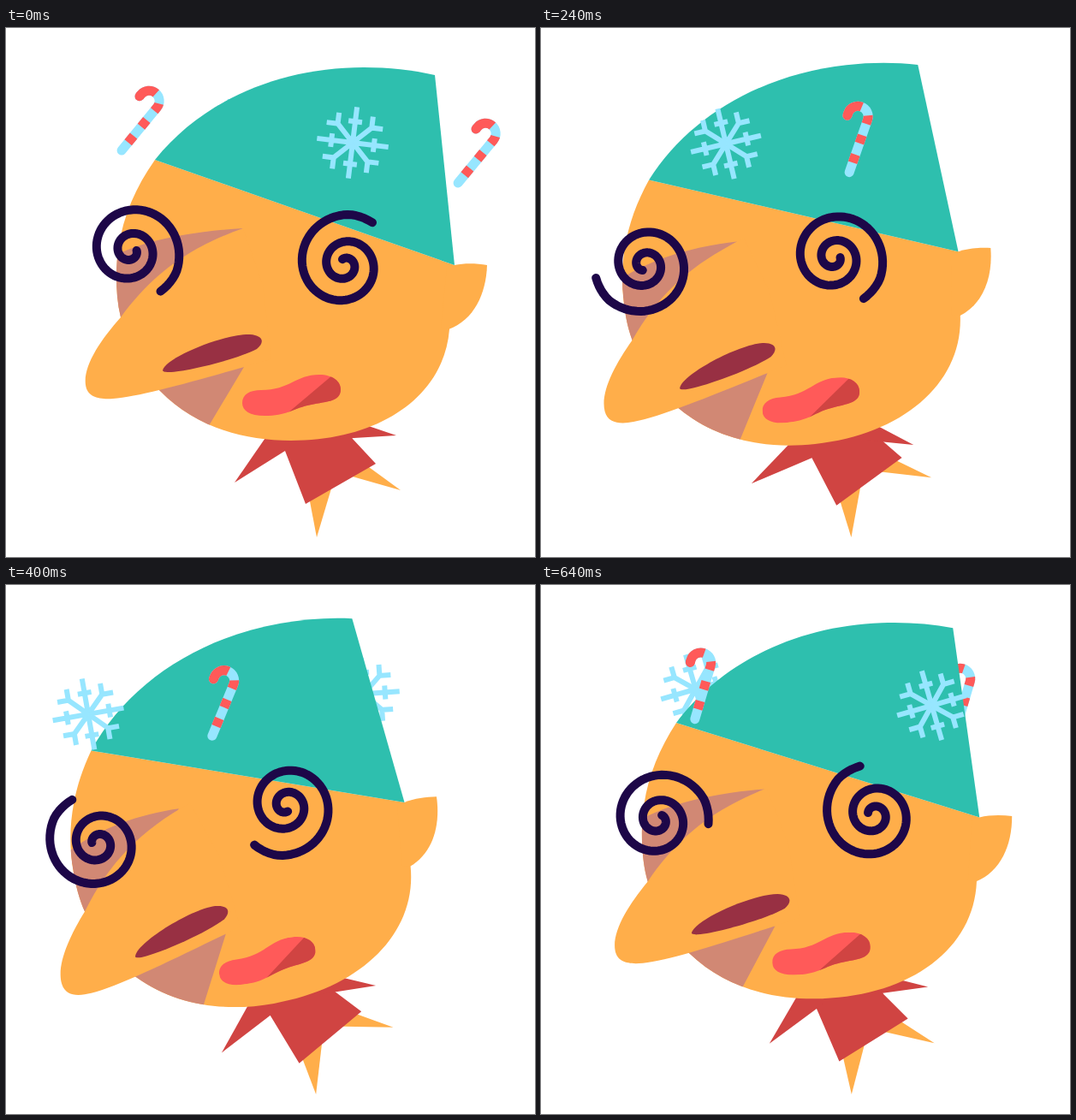
Recreate the animation shown at these times as an HTML page. Size 618 by 618 pixels, loop 0.72 s.

```html
<!DOCTYPE html>
<html lang="en">
<head>
<meta charset="utf-8">
<title>Dizzy elf</title>
<style>
  html, body { margin: 0; width: 100%; height: 100%; overflow: hidden; background: #fff; }
  svg { display: block; width: 100%; height: 100%; }
</style>
</head>
<body>
<svg viewBox="0 0 618 618">
  <defs>
    <path id="face" d="M174 154C145 195 129 240 129 290C129 306 130 322 134 338C145 375 160 405 180 424C220 465 275 482 333 482C437 482 512 430 518 352L524 277Z"/>
    <clipPath id="inFace"><use href="#face"/></clipPath>
    <clipPath id="lips">
      <path d="M276 438C276 428 285 423 298 423C332 423 338 405 366 405C382 405 391 413 391 422C391 438 372 436 352 441C335 445 328 453 302 453C285 453 276 447 276 438Z"/>
    </clipPath>
  </defs>
  <g id="tilt">
    <g id="back"></g>

    <g fill="#ffae4a">
      <path d="M363 595L346 506L389 508Z"/>
      <path id="neckTip"/>
    </g>
    <g fill="#d04442">
      <path d="M310 450L326 494L350 556L432 509L405 480L385 450Z"/>
      <path id="spikeL" d="M267 531L316 460L334 489Z"/>
      <path id="spikeR" d="M456 476L400 457L390 480Z"/>
    </g>

    <use href="#face" fill="#ffae4a"/>
    <path fill="#ffae4a" d="M515 280L524 277C536 274.5 550 275 562 277C561 310 547 341 517 352L508 350Z"/>
    <g fill="#d18874" clip-path="url(#inFace)">
      <path id="browShade"/>
      <path id="chinShade"/>
    </g>
    <path fill="#ffae4a" d="M134 338C110 365 90 395 93 417C95 432 110 434 125 433C155 431 215 414 278 396L310 387L300 300L277 234C215 256 172 286 134 338Z"/>
    <path fill="#983043" d="M183 400C186 385 255 357 285 358C300 359 303 367 293 375C272 386 215 401 190 402C185 402 183 401 183 400Z"/>
    <g id="mouth">
      <g clip-path="url(#lips)">
        <path fill="#ff5a59" d="M270 400H400V460H270Z"/>
        <path fill="#d04442" d="M381 406L330 449L350 470L420 450V400Z"/>
      </g>
    </g>
    <path fill="#2ebfae" d="M174 154C228 86 318 46 418 46C447 46 475 49 501 55L524 277Z"/>

    <g id="front"></g>
    <g fill="none" stroke="#1d0748" stroke-width="10" stroke-linecap="round" stroke-linejoin="round">
      <path id="eyeL"/>
      <path id="eyeR"/>
    </g>
  </g>
</svg>
<script>
const STEP = 80, STEPS = 9, CYCLE = 9.2;
const PIVOT = '362.5 600';
const LOW = 5.1, SWING = 10;
const COLLAR = [0, .18, .55, .86, 1, .25, -.53, -.37, -.13];
const WOBBLE = [7, -4, -9.1, -7, -4.2, 0, 2.2, -1.8, -14];

const $ = id => document.getElementById(id);
const set = (el, attrs) => {
  for (const key in attrs) el.setAttribute(key, attrs[key]);
  return el;
};
const make = (tag, parent, attrs) =>
  parent.appendChild(set(document.createElementNS('http://www.w3.org/2000/svg', tag), attrs));
const smooth = x => x * x * (3 - 2 * x);

// keys: [step, x, y], linear in between
function along(keys, n) {
  const i = Math.max(1, keys.findIndex(k => k[0] >= n));
  const a = keys[i - 1], b = keys[i], f = (n - a[0]) / (b[0] - a[0]);
  return [a[1] + (b[1] - a[1]) * f, a[2] + (b[2] - a[2]) * f];
}

// (dx, dy): spiral centre relative to the point it spins about
function spiralPath(dx, dy) {
  const sweep = 775;
  let d = '';
  for (let a = 0; a <= sweep; a += 5) {
    const g = 1 - a / sweep;
    const r = Math.min(59, 7 + 27 * g + 28 * g * g);
    const t = (53.7 - a) * Math.PI / 180;
    d += (a ? 'L' : 'M') + (r * Math.cos(t) + dx).toFixed(2) + ' ' + (r * Math.sin(t) + dy).toFixed(2);
  }
  return d;
}

function makeFlake() {
  const g = make('g', $('back'), { fill: 'none', stroke: '#97e6ff', 'stroke-width': 6 });
  for (let a = 0; a < 360; a += 90) {
    make('path', g, {
      d: 'M0 0V-42M-8 -25H8M0 0L20 -20M20 -33V-20H33',
      transform: `rotate(${a})`
    });
  }
  return g;
}

function makeCane() {
  const g = make('g', $('back'), { fill: 'none', 'stroke-width': 11 });
  const inner = make('g', g, { transform: 'rotate(32.5) translate(12 38)' });
  const d = 'M0 0V-65A12 12 0 0 0 -24 -65V-62';
  make('path', inner, { d, stroke: '#97e6ff', 'stroke-linecap': 'round' });
  make('path', inner, { d, stroke: '#ff5a59', 'stroke-dasharray': '0 12 10 14 10 14 10 13 40 0' });
  make('circle', inner, { cx: -24, cy: -62, r: 5.5, fill: '#ff5a59' });
  return g;
}

const FLAKE_OUT = [[0, 405, 134], [2, 314, 127], [4, 222, 117], [6, 134, 106], [7, 158, 109], [9, 238, 122]];
const FLAKE_IN = [[0, 274, 120], [5, 499, 144], [6, 544, 148], [7, 520, 147], [8, 473, 144.5], [9, 410, 135]];
const caneAt = x => [x, 106 + .097 * (x - 150)];

const ring = [
  { el: makeFlake(), at: n => along(FLAKE_IN, n), front: n => n >= 7, extra: n => n < 7 ? 6 : 0 },
  { el: makeFlake(), at: n => along(FLAKE_OUT, n), front: n => n < 7 },
  { el: makeCane(), at: n => caneAt(150 + 43.6 * n), front: () => false },
  { el: makeCane(), at: n => caneAt(543 - 43.3 * n), front: () => true }
];

set($('eyeL'), { d: spiralPath(-8.8, .3) });
set($('eyeR'), { d: spiralPath(-10.7, 2) });

function draw(ms) {
  const n = Math.floor(ms / STEP) % STEPS;
  const lean = n < LOW ? smooth(n / LOW) : 1 - smooth((n - LOW) / (CYCLE - LOW));
  const flap = 18 * COLLAR[n];
  const spin = 360 / CYCLE * n;

  set($('tilt'), { transform: `rotate(${-SWING * lean} ${PIVOT})` });
  set($('neckTip'), { d: `M${461 + 4.5 * lean} ${540 - 6.3 * lean}L402 497L380 517Z` });
  set($('spikeL'), { transform: `rotate(${flap} 302 477.5)` });
  set($('spikeR'), { transform: `rotate(${flap} 379 453.5)` });
  set($('mouth'), { transform: `rotate(${3 * lean} 285 438)` });

  // the shade slides along the edges of the nose
  const shift = 14 * lean;
  set($('browShade'), {
    d: `M${277 - shift} ${234 + 4.6 * lean}C${230 - shift} 237 170 245 131 264L110 274V350L140 345L250 260Z`
  });
  set($('chinShade'), {
    d: `M${278 + shift} ${396 - 4.2 * lean}L${238 + shift} ${463 + 6 * lean}L${226 + shift} 490H150V410Z`
  });

  set($('eyeL'), { transform: `translate(154.4 259.8) rotate(${spin})` });
  set($('eyeR'), { transform: `translate(390 267.3) rotate(${spin - 110.4})` });

  for (const item of ring) {
    const [x, y] = item.at(n);
    const turn = WOBBLE[n] + (item.extra ? item.extra(n) : 0);
    $(item.front(n) ? 'front' : 'back').appendChild(item.el);
    set(item.el, { transform: `translate(${x} ${y}) rotate(${turn})` });
  }
}

const start = performance.now();
function tick() {
  draw(performance.now() - start);
  requestAnimationFrame(tick);
}
tick();
</script>
</body>
</html>
```
